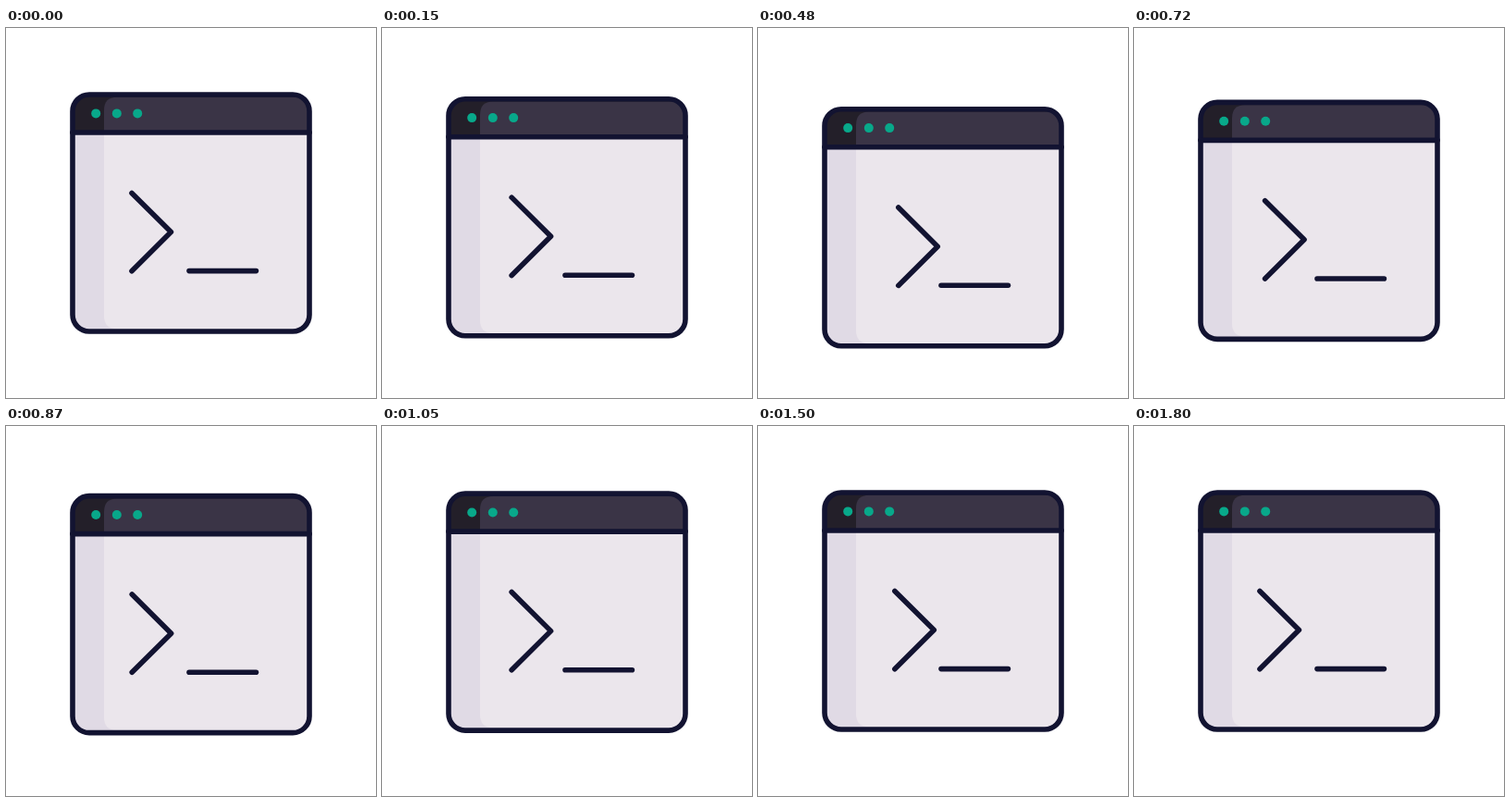
These frames come from a looping animation (400x400 px, 3.83 s). An HTML page:

```html
<!DOCTYPE html>
<html lang="en">
<head>
<meta charset="utf-8">
<title>Terminal window</title>
<style>
  html, body { margin: 0; width: 100%; height: 100%; overflow: hidden; background: #fff; }
  svg { display: block; width: 100%; height: 100%; }
  .line { fill: none; stroke: #121331; stroke-width: 5.6; stroke-linecap: round; stroke-linejoin: round; }
</style>
</head>
<body>
<svg viewBox="0 0 400 400">
  <defs>
    <clipPath id="frame"><rect x="72" y="72" width="256" height="256" rx="18"/></clipPath>
  </defs>
  <g id="window">
    <g clip-path="url(#frame)">
      <rect x="72" y="72" width="256" height="256" fill="#e0dae5"/>
      <rect x="72" y="72" width="256" height="41" fill="#231f29"/>
      <path d="M328 113H106V311Q106 325.2 120 325.2H328Z" fill="#ebe6ec"/>
      <path d="M328 113H106V89Q106 74.8 120 74.8H328Z" fill="#3a3446"/>
    </g>
    <g fill="#08a88a">
      <circle cx="97.2" cy="92.4" r="5"/>
      <circle cx="119.8" cy="92.4" r="5"/>
      <circle cx="142.2" cy="92.4" r="5"/>
    </g>
    <rect class="line" x="72" y="72" width="256" height="256" rx="18"/>
    <path class="line" d="M72 113H328"/>
    <path class="line" id="prompt" d="M136 178.4L178.4 220.5L136 262.7"/>
    <path class="line" id="cursor" d="M198 262.6H270.4"/>
  </g>
</svg>
<script>
  const LOOP = 3830, STEP = 30, MOVE_END = 1800, BEAT = 450;
  const DROP = 15.75, SLIDE = 16;
  const [win, prompt, cursor] = ['window', 'prompt', 'cursor'].map(id => document.getElementById(id));

  const clamp = v => Math.min(1, Math.max(0, v));
  const smooth = u => u * u * (3 - 2 * u);

  // Cubic easing with flat ends and the given horizontal handles.
  function ease(x, x1, x2) {
    let lo = 0, hi = 1;
    for (let i = 0; i < 24; i++) {
      const s = (lo + hi) / 2, r = 1 - s;
      if (3 * r * r * s * x1 + 3 * r * s * s * x2 + s ** 3 < x) lo = s;
      else hi = s;
    }
    return smooth((lo + hi) / 2);
  }

  function dropAt(t) {
    return t < BEAT
      ? DROP * ease(t / BEAT, 0.333, 0.55)
      : DROP * (1 - ease(clamp((t - BEAT) / (2 * BEAT)), 0.333, 0.167));
  }

  function slideAt(t) {
    const phase = (t / BEAT) % 2;
    return SLIDE * smooth(phase < 1 ? phase : 2 - phase);
  }

  function draw(time) {
    const t = Math.min(MOVE_END, Math.floor((time % LOOP) / STEP) * STEP);
    const blink = t % (2 * BEAT);
    win.setAttribute('transform', `translate(0 ${dropAt(t)})`);
    prompt.setAttribute('transform', `translate(${slideAt(t)} 0)`);
    cursor.setAttribute('visibility', blink >= BEAT / 2 && blink < BEAT ? 'hidden' : 'visible');
  }

  const start = performance.now();
  function tick() {
    draw(performance.now() - start);
    requestAnimationFrame(tick);
  }
  tick();
</script>
</body>
</html>
```
